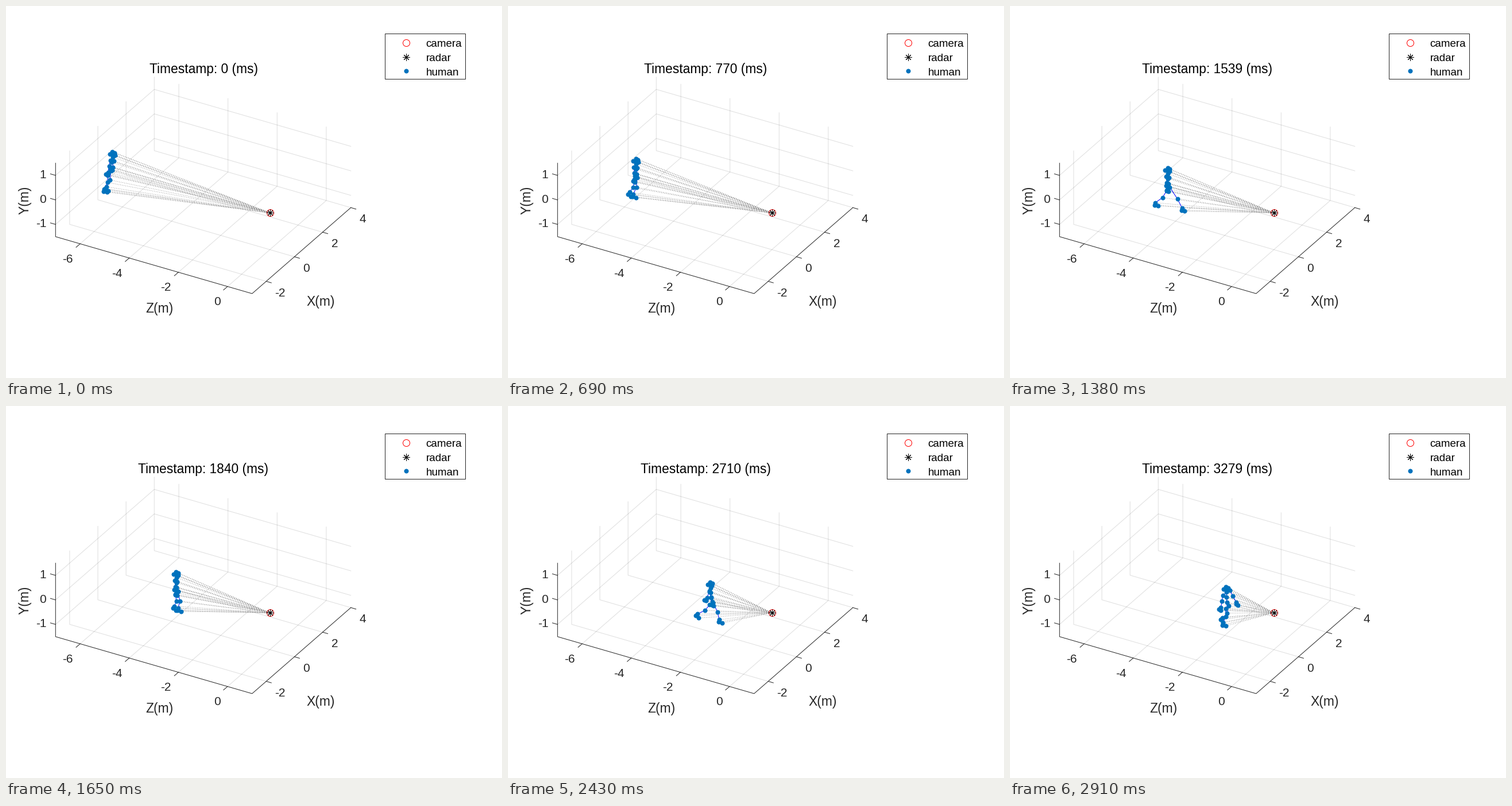
A matplotlib script for the animation above (2.94 s loop, 864 px wide and 648 px high).

```python
import numpy as np
import matplotlib.pyplot as plt
from matplotlib.animation import FuncAnimation
from matplotlib.collections import LineCollection
from matplotlib.patches import Rectangle

W, H, DPI = 864, 648, 72
FRAMES, INTERVAL = 98, 30
INK = "#262626"
HUMAN = "#0072BD"

plt.rcParams["font.family"] = "Liberation Sans"
fig = plt.figure(figsize=(W / DPI, H / DPI), dpi=DPI, facecolor="white")
ax = fig.add_axes([0, 0, 1, 1])
ax.set(xlim=(0, W), ylim=(H, 0))
ax.axis("off")

# Orthographic projection: pixels per metre along each axis
EX, EY, EZ = np.array([[24.57, -21.4], [0, -42.7], [42.8, 12.4]])


def project(x, y, z):
    return np.array([428.7, 501]) + (x + 3) * EX + (y + 1.5) * EY + (z - 1) * EZ


def stroke(points, **kw):
    xs, ys = zip(*points)
    ax.plot(xs, ys, **{"color": INK, "lw": 1, "zorder": 1, **kw})


def label(x, y, s, size, color=INK, **kw):
    return ax.text(x, y, s, fontsize=size, color=color, va="baseline", **kw)


def tick(p, direction):
    stroke([p, p + 9.3 * direction / np.hypot(*direction)])


def draw_axes():
    grid = dict(color=INK, alpha=0.15)
    for x in (-2, 0, 2, 4):
        stroke([project(x, 1.5, -7), project(x, -1.5, -7), project(x, -1.5, 1)], **grid)
        p = project(x, -1.5, 1)
        tick(p, EZ)
        label(p[0] + 15, p[1] + 26, str(x), 20.83)
    for z in (-6, -4, -2, 0):
        stroke([project(4, 1.5, z), project(4, -1.5, z), project(-3, -1.5, z)], **grid)
        p = project(-3, -1.5, z)
        tick(p, -EX)
        label(p[0] - 12.5, p[1] + 32.7, str(z), 20.83, ha="right")
    for y in (-1, 0, 1):
        stroke([project(-3, y, -7), project(4, y, -7), project(4, y, 1)], **grid)
        p = project(-3, y, -7)
        tick(p, -EZ)
        label(p[0] - 16, p[1] + 5, str(y), 20.83, ha="right")
    stroke([project(-3, 1.5, -7), project(-3, -1.5, -7),
            project(-3, -1.5, 1), project(4, -1.5, 1)])
    label(548.5, 522, "X(m)", 22.9, ha="center")
    label(267, 534, "Z(m)", 22.9, ha="center")
    label(40, 338, "Y(m)", 22.9, ha="center", rotation=90, rotation_mode="anchor")


def camera_mark(x, y):
    ax.plot(x, y, "o", ms=12, mfc="none", mec="red", mew=1, zorder=5)


def radar_mark(x, y):
    ax.plot(x, y, marker=(8, 2, 0), ms=12, mec="black", mew=1, zorder=6)


def draw_legend():
    ax.add_patch(Rectangle((660, 48), 140, 79, fc="white", ec=INK, lw=1))
    camera_mark(697, 64)
    radar_mark(697, 89)
    ax.plot(697, 113, "o", ms=8, color=HUMAN, mew=0)
    for i, name in enumerate(("camera", "radar", "human")):
        label(731.5, 71 + 25 * i, name, 18.75, color="black")


# Gait: a step every STEP frames onto the next foothold, feet alternating
STEP = 15.7
HOLDS = (173, 216, 255, 298, 328, 366, 373, 385)
NEAR, FAR = -1, 1


def head_at(n):
    """Walk that speeds up and slows down again, in screen pixels."""
    x = 185 + 1.2 * n + 37.4 * (1 - np.cos(np.pi * n / 97))
    return np.array([x, 253.7 + 0.32 * (x - 185)])


def foot_at(n, side):
    """Ankle position and heel lift: planted, or swinging to the next hold."""
    count, t = divmod((n + 0.5) / STEP, 1)
    goal = int(count) + 1
    if goal % 2 == (side == FAR):
        start, end = HOLDS[max(goal - 2, 0)], HOLDS[goal]
    else:
        start = end = HOLDS[goal - 1]
        t = 0
    x = start + (end - start) * t * t * (3 - 2 * t)
    y = 317 + 0.295 * (x - 173) - 6 * np.sin(np.pi * t)
    return np.array([x + 2 * side, y - 1.5 * side]), np.sin(np.pi * np.sqrt(t))


def arm(shoulder, reach):
    elbow, wrist, tip = (shoulder + f * reach for f in (0.4, 0.8, 1))
    return [shoulder, elbow, wrist, tip, tip + (-2.5, -1.5), wrist]


def leg(hip, ankle, lift):
    knee = (hip + ankle) / 2 + (2.5, 2)
    c, s = np.cos(0.58 * lift), np.sin(0.58 * lift)
    turn = np.array([[c, -s], [s, c]])
    return [hip, knee, ankle, ankle + turn @ (-1, 4), ankle + turn @ (5, 5.5), ankle]


def skeleton(n):
    """Return the joints and the bone chains at one step."""
    head = head_at(n)
    lean = 2 - 7 * np.exp(-n / 20)
    twist = min(1, n / 70) * np.cos(np.pi * (n - 66) / STEP)
    neck = head + (0.5, 9.5)
    pelvis = head + (lean, 36)
    face = [head + (-4.5, 4), head, head + (3.5, 2), head + (0.5, 5)]
    spine = [neck + f * (pelvis - neck) for f in (0, 0.33, 0.67, 1)]

    joints = face + spine[:3]
    bones = [face[:3], face[3:] + spine]
    for side, swing in ((NEAR, -6), (FAR, 12)):
        shoulder = neck + (0, 1) + side * np.array([4 + 2 * twist, -4.5])
        hip = pelvis + side * np.array([2.5, -2.5])
        upper = arm(shoulder, np.array([lean + swing * twist, 26]))
        lower = leg(hip, *foot_at(n, side))
        joints += upper[:5] + lower[:5]
        bones += [[neck] + upper, [pelvis] + lower]
    return np.array(joints), bones


def stamp(n):
    # one sample is dropped late in the recording
    return round(33.453 * n + 0.45 + (33.4 if n > 88 else 0))


draw_axes()
draw_legend()
RADAR = project(0, 0, 0)
camera_mark(*RADAR)
radar_mark(*RADAR)
title = label(344, 117, "", 22.7, ha="center", color="black")
rays = LineCollection([], colors="0.45", linewidths=0.75,
                      linestyles=[(0, (1.3, 2.7))], zorder=2)
limbs = LineCollection([], colors="blue", linewidths=1, zorder=3)
ax.add_collection(rays)
ax.add_collection(limbs)
dots, = ax.plot([], [], "o", ms=8, color=HUMAN, mew=0, zorder=4)


def update(n):
    joints, bones = skeleton(n)
    rays.set_segments([[RADAR, j] for j in joints])
    limbs.set_segments(bones)
    dots.set_data(joints[:, 0], joints[:, 1])
    title.set_text(f"Timestamp: {stamp(n)} (ms)")
    return rays, limbs, dots, title


anim = FuncAnimation(fig, update, frames=FRAMES, interval=INTERVAL,
                     repeat=True, repeat_delay=0, blit=False)
plt.show()
```
